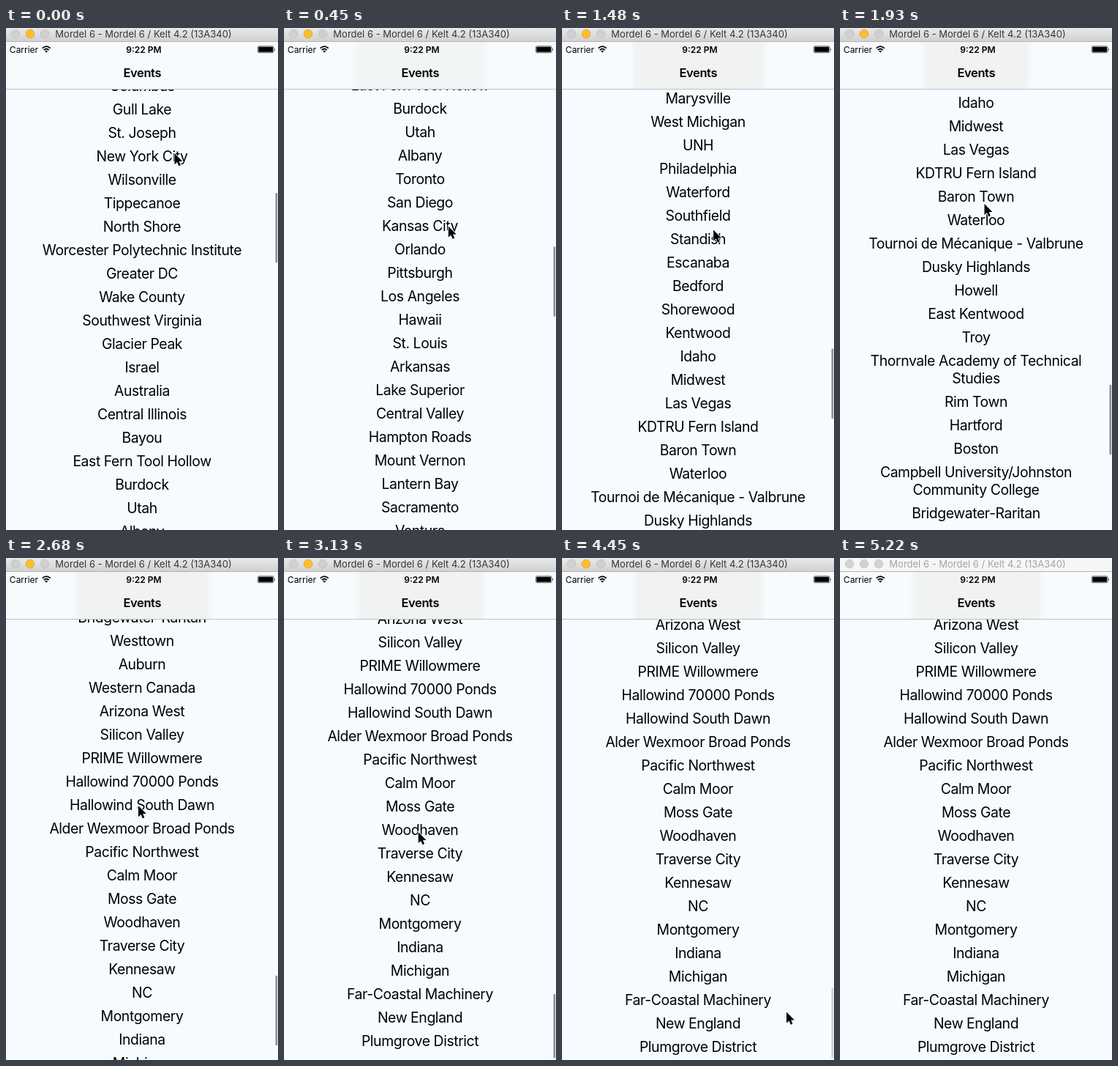
An HTML page for the animation above (5320 ms loop, 372 by 685 pixels).

```html
<!DOCTYPE html>
<html lang="en">
<head>
<meta charset="utf-8">
<style>
  html, body { margin: 0; width: 100%; height: 100%; overflow: hidden; background: #f6fbff; }
  svg { display: block; width: 372px; height: 685px; font-family: Inter, Roboto, sans-serif; }
  text { text-anchor: middle; }
  #list { font-size: 19.4px; letter-spacing: -.42px; }
  .status { font-size: 12px; }
  .idle #bar { fill: #f6f6f6; }
  .idle #caption { fill: #a3a3a3; }
  .idle .light { fill: #d2d2d2; stroke: #c6c6c6; }
</style>
</head>
<body>
<svg id="stage" viewBox="0 0 372 685">
  <defs>
    <linearGradient id="metal" x2="0" y2="1">
      <stop stop-color="#e9e9e9"/><stop offset="1" stop-color="#d1d1d1"/>
    </linearGradient>
    <filter id="soft" x="-10%" width="120%"><feGaussianBlur stdDeviation="3 0"/></filter>
  </defs>
  <rect width="372" height="685" fill="#f6fbff"/>
  <g id="list"></g>
  <rect id="thumb" x="368.5" width="2.7" rx="1.3" fill="#8b9196"/>

  <rect y="19" width="372" height="64" fill="#f8fbfd"/>
  <rect id="shade" y="19" height="64" fill="#f1f3f3" filter="url(#soft)"/>
  <rect y="83" width="372" height="1" fill="#bcc2c5"/>
  <text x="186.3" y="67" font-size="16.5" font-weight="600" letter-spacing="-.4">Events</text>

  <text class="status" x="24.5" y="33.5">Carrier</text>
  <path d="M49.6 27.6q5.6-5 11.2 0M51.8 30q3.4-3 6.8 0" fill="none" stroke="#000" stroke-width="1.7"/>
  <path d="M53.2 31.6q2-1.6 4 0l-2 2.2z"/>
  <text class="status" x="188.5" y="33.5" font-weight="600">9:22 PM</text>
  <rect x="344.3" y="24.8" width="21.8" height="8.9" rx="1.8" fill="none" stroke="#000" stroke-width=".6"/>
  <rect x="345.3" y="25.8" width="19.8" height="6.9" rx=".8"/>
  <path d="M367 27.6q1.8 1.7 0 3.4z"/>

  <rect id="bar" width="372" height="18" fill="url(#metal)"/>
  <rect y="18" width="372" height="1" fill="#b4b4b4"/>
  <g stroke="#bebebe" stroke-width=".8">
    <circle class="light" cx="13" cy="8" r="5.8" fill="#d0d0d0"/>
    <circle class="light" cx="33" cy="8" r="5.8" fill="#ffbd2e" stroke="#e0a128"/>
    <circle class="light" cx="53" cy="8" r="5.8" fill="#d0d0d0"/>
  </g>
  <text id="caption" x="188" y="13" font-size="13" fill="#363636">Mordel 6 - Mordel 6 / Kelt 4.2 (13A340)</text>

  <path id="cursor" d="M0 0V15.2L3.5 12.1L5.9 17.3L8.4 16.2L6.2 11.1H10.9Z"
        stroke="#fff" stroke-width="1.6" paint-order="stroke"/>
</svg>
<script>
const LOOP = 5320, TICK = 148.4, BLUR_AT = 5220;
const ROW = 32, LINE = 24, FIRST_Y = 86;
const END = 2532, THUMB_TOP = 225, THUMB_LEN = 95.5, THUMB_RATIO = 7;

// "|" breaks a name into two lines
const names = `Columbus,Gull Lake,St. Joseph,New York City,Wilsonville,Tippecanoe,North Shore,
Worcester Polytechnic Institute,Greater DC,Wake County,Southwest Virginia,Glacier Peak,Israel,
Australia,Central Illinois,Bayou,East Fern Tool Hollow,Burdock,Utah,Albany,Toronto,San Diego,
Kansas City,Orlando,Pittsburgh,Los Angeles,Hawaii,St. Louis,Arkansas,Lake Superior,Central Valley,
Hampton Roads,Mount Vernon,Lantern Bay,Sacramento,Ventura,Colorado,Iowa,Finger Lakes,Oklahoma,
North Bay,Dallas,Wisconsin,Lowen Parkside,Central Maryland,Lansing,Livonia,Marysville,
West Michigan,UNH,Philadelphia,Waterford,Southfield,Standish,Escanaba,Bedford,Shorewood,Kentwood,
Idaho,Midwest,Las Vegas,KDTRU Fern Island,Baron Town,Waterloo,Tournoi de Mécanique - Valbrune,
Dusky Highlands,Howell,East Kentwood,Troy,Thornvale Academy of Technical|Studies,Rim Town,
Hartford,Boston,Campbell University/Johnston|Community College,Bridgewater-Raritan,Westtown,
Auburn,Western Canada,Arizona West,Silicon Valley,PRIME Willowmere,Hallowind 70000 Ponds,
Hallowind South Dawn,Alder Wexmoor Broad Ponds,Pacific Northwest,Calm Moor,Moss Gate,Woodhaven,
Traverse City,Kennesaw,NC,Montgomery,Indiana,Michigan,Far-Coastal Machinery,New England,
Plumgrove District`.split(/,\s*/);

// Keys are [tick, value]
const scrollKeys = [[0, 0], [6, 988], [13, 1833], [18, 2414], [21, 2540], [25, 2574], [28, END]];
const cursorX = [[0, 230.5], [6, 218.5], [13, 197.5], [18, 181], [25, 194.5], [30, 307], [31, 335], [32, 363]];
const cursorY = [[0, 171], [6, 330], [13, 240], [18, 338], [25, 426.5], [30, 619.5], [31, 681], [32, 742]];
const shadeKeys = [[0, 40], [6, 119], [13, 72], [18, 92], [25, 77], [30, 88]];
const fadeKeys = [[29, 1], [30, .4], [31, 0]];

const $ = id => document.getElementById(id);
const set = (id, attrs) => {
  for (const key in attrs) $(id).setAttribute(key, attrs[key]);
};

// Monotone cubic interpolation
function at(keys, x) {
  const last = keys.length - 1;
  if (x <= keys[0][0]) return keys[0][1];
  if (x >= keys[last][0]) return keys[last][1];
  const i = keys.findIndex(k => k[0] > x) - 1;
  const secant = j => (keys[j + 1][1] - keys[j][1]) / (keys[j + 1][0] - keys[j][0]);
  const slope = j => {
    if (j === 0) return secant(0);
    if (j === last) return secant(last - 1);
    const a = secant(j - 1), b = secant(j);
    return a * b > 0 ? 2 * a * b / (a + b) : 0;
  };
  const [x0, y0] = keys[i], [x1, y1] = keys[i + 1];
  const h = x1 - x0, u = (x - x0) / h, v = 1 - u;
  return v * v * ((1 + 2 * u) * y0 + u * h * slope(i))
       + u * u * ((1 + 2 * v) * y1 - v * h * slope(i + 1));
}

function buildList() {
  let y = FIRST_Y;
  for (const name of names) {
    const lines = name.split("|");
    lines.forEach((line, i) => {
      const label = document.createElementNS("http://www.w3.org/2000/svg", "text");
      label.setAttribute("x", 186);
      label.setAttribute("y", y + i * LINE);
      label.textContent = line;
      $("list").append(label);
    });
    y += ROW + (lines.length - 1) * LINE;
  }
}

function draw(time) {
  const t = time % LOOP;
  const tick = Math.min(32, Math.floor((t + 8) / TICK));
  const scroll = Math.round(at(scrollKeys, tick));
  const over = Math.max(0, scroll - END);
  const half = at(shadeKeys, tick);
  set("list", { transform: `translate(0 ${-scroll})` });
  set("thumb", {
    y: THUMB_TOP + Math.min(scroll, END) / THUMB_RATIO + over,
    height: THUMB_LEN - over,
    opacity: at(fadeKeys, tick)
  });
  set("shade", { x: 187 - half, width: 2 * half, opacity: Math.min(1, tick / 4) });
  set("cursor", { transform: `translate(${at(cursorX, tick)} ${at(cursorY, tick)})` });
  $("stage").classList.toggle("idle", t >= BLUR_AT);
}

buildList();
const start = performance.now();
(function loop() {
  draw(performance.now() - start);
  requestAnimationFrame(loop);
})();
</script>
</body>
</html>
```
